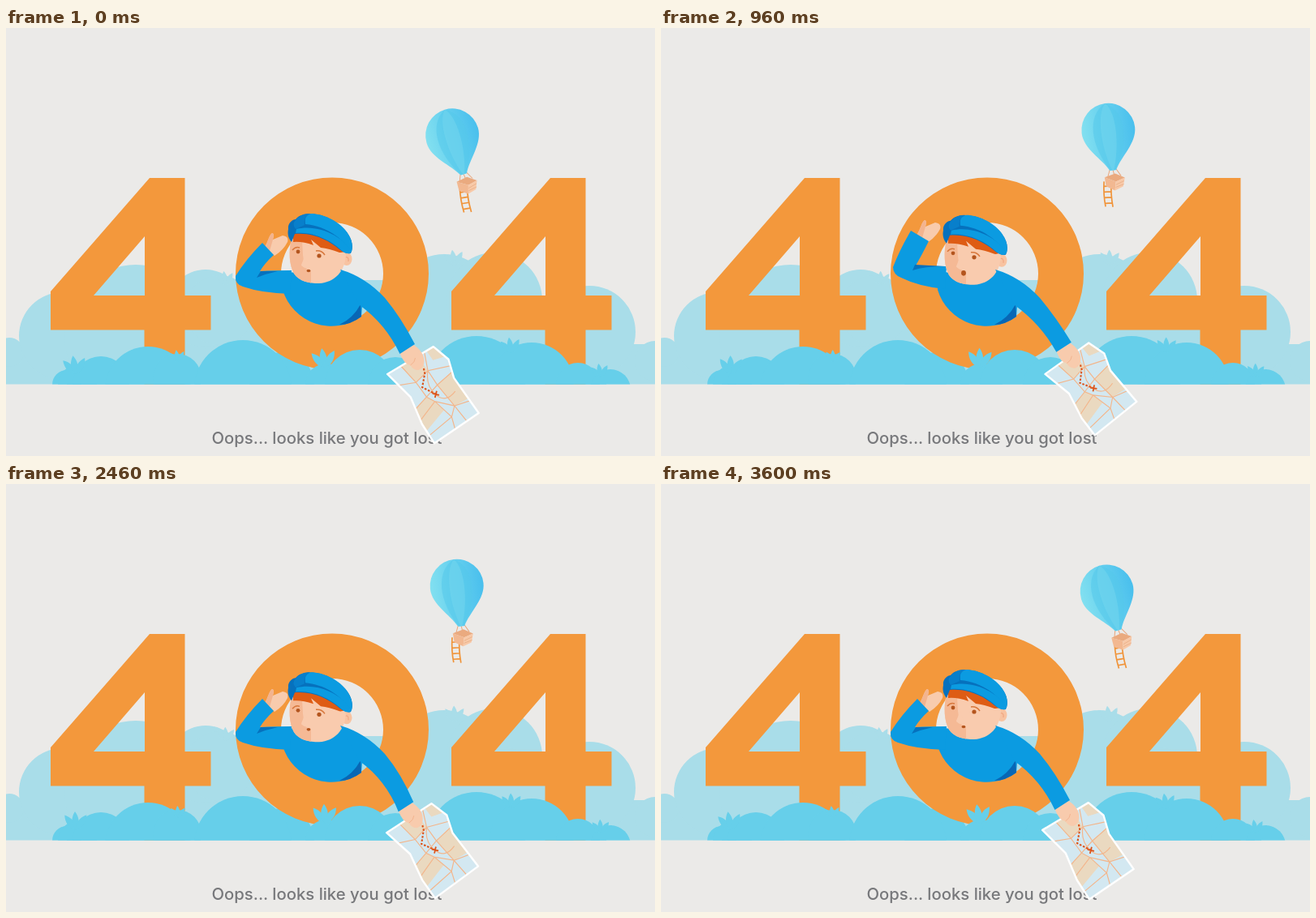
Write an HTML page that moves like this. It is 800 by 528 pixels and loops after 3630 ms.

```html
<!DOCTYPE html>
<html lang="en">
<head>
<meta charset="utf-8">
<title>404</title>
<style>
html, body { margin: 0; width: 100%; height: 100%; overflow: hidden; background: #ebeae8; }
svg { display: block; width: 800px; height: 528px; }
text { font: 500 20.3px Inter, "Open Sans", sans-serif; fill: #77787b; text-anchor: middle; }
</style>
</head>
<body>
<svg viewBox="0 0 800 528">
  <defs>
    <linearGradient id="sky"><stop stop-color="#82e0f0"/><stop offset="1" stop-color="#49bfed"/></linearGradient>
    <clipPath id="ground"><path d="M0 0H800V439.500H0Z"/></clipPath>
    <path id="paper" d="M-33 0 33 0 41 23 35 46 39 99-27 103-28 75-23 39Z"/>
    <clipPath id="sheet"><use href="#paper"/></clipPath>
    <path id="four" fill-rule="evenodd" d="M177 185H220.500V330H252.500V372.500H220.500V440H170.500V372.500H55V325ZM171 257 108 330H171Z"/>
    <path id="leaf" d="M0 0C-6-7-5-16 0-23C5-16 6-7 0 0Z"/>
    <g id="tuft">
      <use href="#leaf" transform="rotate(-42)"/><use href="#leaf" transform="rotate(-8)"/><use href="#leaf" transform="rotate(30)"/>
    </g>
  </defs>

  <g id="ladder" fill="none" stroke="#f0943a" stroke-width="1.700">
    <path d="M-4-2Q-6 14-4 29M5-2Q3 14 5 30M-4 4H5M-5 11H4M-5 18H4M-4.500 25H4.500"/>
  </g>
  <g id="balloon">
    <path d="M-4-14-8-4M0-13 1-4M4-14 9-5" stroke="#e9a67c"/>
    <path d="M-4-13C-12-29-33-43-33-63A33 33 0 0 1 33-63C33-43 12-29 4-13Z" fill="url(#sky)"/>
    <path d="M-3-13C-24-45-25-84 0-96C25-84 24-45 3-13Z" fill="#55c8ec" opacity=".55"/>
    <path d="M-1-13C-12-45-12-84 0-96C12-84 12-45 1-13Z" fill="#72d5ef" opacity=".6"/>
  </g>
  <g id="basket">
    <path d="M-12-4 1-9 13-4 2 1Z" fill="#eaaa7f"/>
    <path d="M-12-4 2 1 1 12-10 7Z" fill="#f2b891"/>
    <path d="M2 1 13-4 11 7 1 12Z" fill="#f8c9a8"/>
    <path d="M2 5 12 0M2 8 12 4" stroke="#e8ae86" stroke-width=".8"/>
  </g>

  <g clip-path="url(#ground)">
    <g fill="#a9dde9">
      <path d="M0 390H800V440H0ZM283 311H521V440H283Z"/>
      <circle cx="4" cy="400" r="18"/><circle cx="70" cy="380" r="54"/><circle cx="160" cy="380" r="88"/>
      <circle cx="246" cy="346" r="48"/><circle cx="263" cy="348" r="43"/>
      <circle cx="540" cy="341" r="62"/><circle cx="602" cy="336" r="59"/><circle cx="612" cy="385" r="60"/>
      <circle cx="719" cy="375" r="57"/><circle cx="800" cy="411" r="25"/>
      <use href="#tuft" transform="translate(271 317) scale(.75)"/>
      <use href="#tuft" transform="translate(553 293) scale(.85)"/>
    </g>
    <circle cx="340" cy="440" r="40" fill="#66cfea"/>
    <g fill="#f3983c">
      <use href="#four"/><use href="#four" x="494"/>
      <path fill-rule="evenodd" d="M283 303a119 118.500 0 0 1 238 0a119 118.500 0 0 1-238 0M339 303a63 63 0 0 0 126 0a63 63 0 0 0-126 0"/>
    </g>
    <g fill="#66cfea">
      <path d="M75 428H740V440H75Z"/>
      <circle cx="75" cy="440" r="18"/><circle cx="88" cy="440" r="24"/><circle cx="117" cy="440" r="35"/>
      <circle cx="175" cy="446" r="53"/><circle cx="211" cy="432" r="30"/><circle cx="292" cy="445" r="60"/>
      <circle cx="395" cy="440" r="26"/><circle cx="436" cy="440" r="43"/><circle cx="480" cy="440" r="34"/>
      <circle cx="515" cy="440" r="32"/><circle cx="580" cy="440" r="60"/><circle cx="648" cy="440" r="52"/>
      <circle cx="705" cy="440" r="27"/><circle cx="745" cy="446" r="25"/>
      <use href="#tuft" transform="translate(86 427)"/>
      <use href="#tuft" transform="translate(212 412) scale(.65)"/>
      <use href="#tuft" transform="translate(393 419) scale(1.050)"/>
      <use href="#tuft" transform="translate(623 401) scale(.85)"/>
      <use href="#tuft" transform="translate(733 431) scale(.75)"/>
    </g>
  </g>

  <text x="395.500" y="512.500">Oops... looks like you got lost</text>

  <path d="M341 300Q380 306 412 296L440 330 438 356A63 63 0 0 1 341 323Z" fill="#0b9be1"/>
  <path d="M437 341 438 356Q425 366 411 366Q428 358 437 341Z" fill="#0867b5"/>

  <g id="palm">
    <path d="M319 270C323 264 324 256 328 253Q331 253 329 261L341 256Q349 257 347 264Q342 274 331 281Z" fill="#f8cbad"/>
    <path d="M319 270C323 264 324 256 328 253Q331 253 329 261L325 275Z" fill="#f3b48f"/>
  </g>
  <path id="arm" fill="#0b9be1"/>
  <path id="fold" fill="#0671bd"/>

  <g id="head">
    <ellipse cx="420" cy="285" rx="6.500" ry="8" fill="#f8c3a1"/>
    <path d="M417 283Q423 281 422 288" fill="none" stroke="#f0a985" stroke-width="1.300"/>
    <path d="M352 260C348 274 349 293 355 303C362 313 373 315 386 315C405 314 418 300 419 280L410 262Z" fill="#f9cbae"/>
    <path d="M352 260C348 274 349 293 355 303C360 310 367 313 376 314.500V300L364 293Q368 290 366 280L365 262Z" fill="#f5b995"/>
    <path d="M364 292Q368 299 373 293L369 280Z" fill="#f9cbae"/>
    <g fill="#b4551e"><circle cx="360" cy="276" r="2.400"/><circle cx="386" cy="281" r="2.600"/></g>
    <path d="M353 274Q357 269 362 271M382 275Q389 274 393 280" fill="none" stroke="#d8783d" stroke-width="1.500"/>
    <ellipse id="mouth" cx="373" fill="#b4551e"/>
    <path d="M354 248 424 268Q419 278 411 277Q398 272 388 271L376 261 379 268Q365 263 354 264Z" fill="#de5c14"/>
    <path d="M348 248C347 241 353 236 357 236C365 225 391 228 407 240C425 252 430 267 425 278Q418 279 411 273C397 261 377 252 356 254L352 264Q346 257 348 248Z" fill="#0671bd"/>
    <path d="M369 242C368 234 370 230 376 229C391 229 409 238 418 249C426 259 428 267 426 276C410 254 390 244 369 242Z" fill="#0b9be1"/>
    <path d="M358 248C382 242 412 254 426 275L424 278Q418 279 413 274C399 261 378 251 357 253Z" fill="#0b9be1"/>
    <path d="M357 237Q364 228 375 229Q366 234 368 243L357 248Q352 242 357 237Z" fill="#087fcb"/>
  </g>

  <g id="map">
    <g clip-path="url(#sheet)">
      <path d="M-45-5H50V110H-45Z" fill="#d3e8f1"/>
      <path fill="#ead9c0" d="M-14-2H10L12 22-8 27ZM23 0H45L40 18 24 14ZM13 43 36 38 40 77 18 76ZM-32 57-6 49 0 59 4 74-30 86Z"/>
      <path fill="none" stroke="#f3b68c" stroke-width="1.200" d="M-36 16-8 27 12 22 45 33M-14-2-8 27-6 49 0 59 8 86 2 108M20 0 12 22 13 43 18 76 45 82M-32 57-6 49 13 43 40 38M-32 72 0 59 18 76 8 86-30 92M18 76 22 105M12 22Q0 36 5 52T28 61"/>
    </g>
    <use href="#paper" fill="none" stroke="#fff" stroke-width="2.400" stroke-linejoin="round"/>
    <path d="M9 17 7 23-4.500 36 5 51" fill="none" stroke="#dc541b" stroke-width="2.100" stroke-dasharray="2.600 1.900"/>
    <path d="M2.500 49 8.500 55M8.500 49 2.500 55" stroke="#dc541b" stroke-width="1.800"/>
  </g>
  <g id="grip">
    <path d="M-13-9 4-19C12-14 17-7 17 1Q17 9 10 12Q3 12 0 6Q-8 5-13-9Z" fill="#f8cbad"/>
    <path d="M0 6Q6 2 6-3" fill="none" stroke="#f3b48f"/>
  </g>
  <path id="sleeve" fill="#0b9be1"/>
</svg>

<script>
const LOOP = 3630, HALF = LOOP / 2;
const $ = id => document.getElementById(id);
const set = (id, name, value) => $(id).setAttribute(name, value);
const pose = (id, value) => set(id, 'transform', value);

const clamp = u => Math.min(1, Math.max(0, u));
const span = (t, from, to) => clamp((t - from) / (to - from));
const ease = (t, from, to) => (1 - Math.cos(Math.PI * span(t, from, to))) / 2;
const hump = (t, from, to) => Math.sin(Math.PI * span(t, from, to));
const wave = (t, peak) => Math.cos((t - peak) / HALF * 2 * Math.PI);

// Path whose numbers run between two poses
function blend(a, b, k) {
  const to = b.match(/\d+/g);
  let i = 0;
  return a.replace(/\d+/g, n => +n + (to[i++] - n) * k);
}
const armLow = 'M316 265Q296 285 283 306Q282 316 292 319Q315 327 350 328L352 299Q330 299 313 300Q319 290 330 280Z';
const armHigh = 'M308 250Q294 274 286 295Q286 304 296 308Q318 319 350 322L352 294Q334 294 314 293Q321 281 330 263Z';
const foldLow = 'M314 300L335 300Q321 303 309 308Z';
const foldHigh = 'M313 292L350 294Q325 294 310 299Z';

function drawBalloon(t) {
  const x = 563.5 + 5 * wave(t, 150), y = 190.5 + 2.5 * wave(t, -110);
  const swing = wave(t, -120), tilt = -11.3 - 5.5 * swing;
  pose('balloon', `translate(${x} ${y}) rotate(${tilt})`);
  pose('basket', `translate(${x} ${y}) rotate(${tilt / 2 + 4})`);
  pose('ladder', `translate(${x - 6.5 + 2.5 * swing} ${y + 4 + 1.5 * swing}) rotate(${-6.5 - 3.5 * swing})`);
}

function drawBoy(t) {
  const lift = ease(t, 0, 310) - ease(t, 1250, 1680);
  set('arm', 'd', blend(armLow, armHigh, lift));
  set('fold', 'd', blend(foldLow, foldHigh, lift));
  pose('palm', `translate(${-3 * lift} ${-16 * lift})`);

  const nod = 4.8 * hump(t, 0, 1100) + 3.9 * hump(t, 1350, 3000);
  pose('head', `translate(0 ${nod})`);
  set('mouth', 'cy', 299.5 + lift);
  set('mouth', 'rx', 2.4 + .5 * lift);
  set('mouth', 'ry', 1.8 + 1.5 * lift);
}

function drawMap(t) {
  // The paper curls up twice and drops between
  const curl = hump(t, 0, 1230) - .6 * hump(t, 1230, 1490) + .9 * hump(t, 1490, 2580);
  const dip = 4 * hump(t, 0, 760) - 2.5 * hump(t, 760, 1300) + 2.3 * hump(t, 1750, 2910);
  const x = 498.5 - .8 * dip, y = 410 + dip;
  pose('map', `translate(${x} ${y}) rotate(${-30.8 - 7.5 * curl}) scale(1 ${1 - .09 * curl})`);
  pose('grip', `translate(${x} ${y})`);
  set('sleeve', 'd', `M412 298Q443 307 467 333Q487 357 ${x + 5.5} ${y - 20}L${x - 13} ${y - 8}Q468 365 436 342Z`);
}

function draw(t) {
  drawBalloon(t);
  drawBoy(t);
  drawMap(t);
  pose('tuft', `rotate(${3 - 4 * wave(t, 0)})`);
}

function tick(now) {
  draw(now % LOOP);
  requestAnimationFrame(tick);
}
draw(0);
requestAnimationFrame(tick);
</script>
</body>
</html>
```
